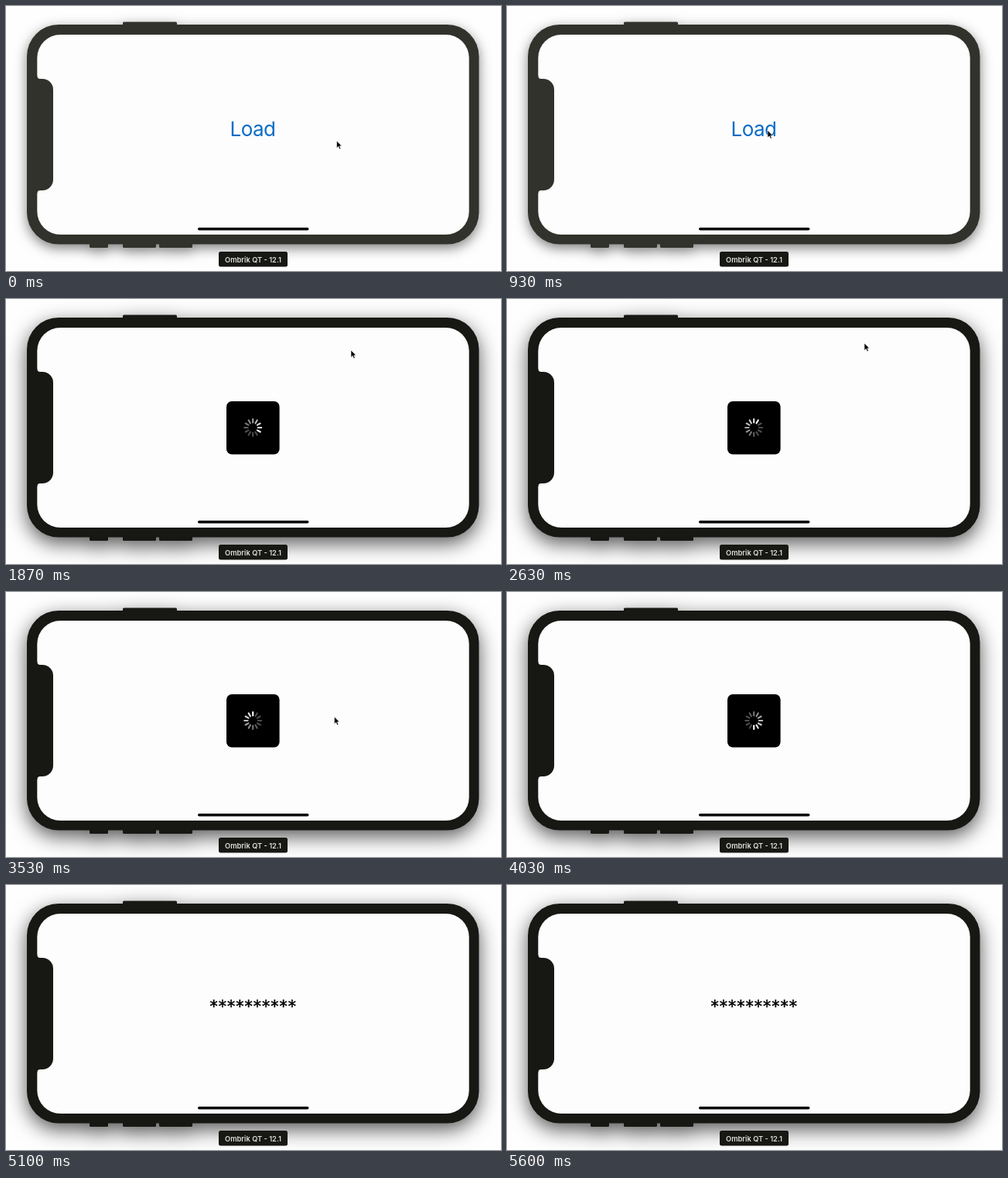
An HTML page that plays this animation: 640x342 px, repeating every 5630 ms.

```html
<!DOCTYPE html>
<html lang="en">
<head>
<meta charset="utf-8">
<title>Loading indicator</title>
<style>
  html, body { margin: 0; width: 100%; height: 100%; overflow: hidden; background: #fefefe; }
  svg { display: block; width: 100vw; height: 100vh; }
  text { text-anchor: middle; font-family: Inter, Roboto, sans-serif; }
  #scene { --case: #32322c; --shadow: 0 5px 8px rgb(0 0 0 / .5); }
  #scene.focused { --case: #171714; --shadow: 0 8px 13px rgb(0 0 0 / .66); }
  .case { fill: var(--case); }
  #body { filter: drop-shadow(var(--shadow)); }
  #load { font-size: 26px; letter-spacing: -.02em; fill: #0a6cc6; }
  #stars { font: 20.5px "DejaVu Sans", sans-serif; letter-spacing: 1px; stroke: #000; stroke-width: .5; }
  #label { font-size: 9.3px; font-weight: 600; fill: #dedede; }
</style>
</head>
<body>
<svg viewBox="0 0 640 342">
  <g id="scene">
    <g id="body" class="case">
      <rect x="151" y="20.5" width="70" height="6" rx="1.5"/>
      <rect x="108" y="304" width="24" height="8" rx="1.5"/>
      <rect x="151" y="304" width="43" height="8" rx="1.5"/>
      <rect x="198" y="304" width="43" height="8" rx="1.5"/>
      <rect x="27" y="24" width="584.5" height="283.5" rx="41"/>
    </g>
    <rect x="40.3" y="37" width="558.4" height="258" rx="30" fill="#fdfdfd"/>
    <path class="case" d="M39 90h1.3q0 4 4 4h2.7a14 14 0 0 1 14 14v116a14 14 0 0 1-14 14h-2.7q-4 0-4 4H39z"/>
    <rect x="248" y="286" width="143.5" height="3.6" rx="1.8"/>
    <rect x="275" y="317" width="89" height="19.5" rx="2.5" fill="#171714"/>
    <text id="label" x="319.5" y="330.5">Ombrik QT - 12.1</text>
    <text id="load" x="319" y="168">Load</text>
    <text id="stars" x="319.8" y="164.3">**********</text>
    <g id="hud">
      <rect x="285" y="132" width="68.6" height="68.6" rx="7"/>
      <g id="spinner" transform="translate(319.2 166)" stroke-width="2.1" stroke-linecap="round"></g>
    </g>
    <path id="cursor" d="M0 0V9.4L2.2 7.3 3.7 10.8 5.3 10.1 3.9 6.7H6.7z" stroke="#fdfdfd" stroke-width=".6"/>
  </g>
</svg>
<script>
const LOOP = 5630, PRESS = 1080, SHOW = 1170, DONE = 4170;
const $ = id => document.getElementById(id);

// Cursor stops: time, x, y
const stops = [
  [0, 427.5, 174], [930, 337, 160.5], [SHOW, 337, 160.5], [1870, 446, 66],
  [2630, 462, 57], [3530, 424.5, 161], [4130, 405, 356], [LOOP, 405, 356]
];

const spokes = Array.from({ length: 12 }, (_, i) => {
  const line = document.createElementNS("http://www.w3.org/2000/svg", "line");
  line.setAttribute("y1", -6.6);
  line.setAttribute("y2", -11);
  line.setAttribute("transform", `rotate(${i * 30})`);
  $("spinner").append(line);
  return line;
});

function cursorAt(t) {
  const i = stops.findIndex(s => s[0] > t);
  const [t0, x0, y0] = stops[i - 1], [t1, x1, y1] = stops[i];
  const p = (t - t0) / (t1 - t0), e = p * p * (3 - 2 * p);
  return `translate(${x0 + (x1 - x0) * e} ${y0 + (y1 - y0) * e})`;
}

// One turn per second, in twelve steps, with a fading tail
function spin(t) {
  const head = Math.floor(t * 12 / 1000 + 5.86) + 12;
  spokes.forEach((line, i) => {
    const k = 255 * Math.max(.3, 1 - (head - i) % 12 * .09);
    line.setAttribute("stroke", `rgb(${k},${k},${k})`);
  });
}

function draw() {
  const t = performance.now() % LOOP;
  $("scene").setAttribute("class", t >= PRESS ? "focused" : "");
  $("load").style.opacity = t < PRESS ? 1 : t < SHOW ? .3 : 0;
  $("hud").style.opacity = +(t >= SHOW && t < DONE);
  $("stars").style.opacity = +(t >= DONE);
  $("cursor").setAttribute("transform", cursorAt(t));
  spin(t);
  requestAnimationFrame(draw);
}
draw();
</script>
</body>
</html>
```
